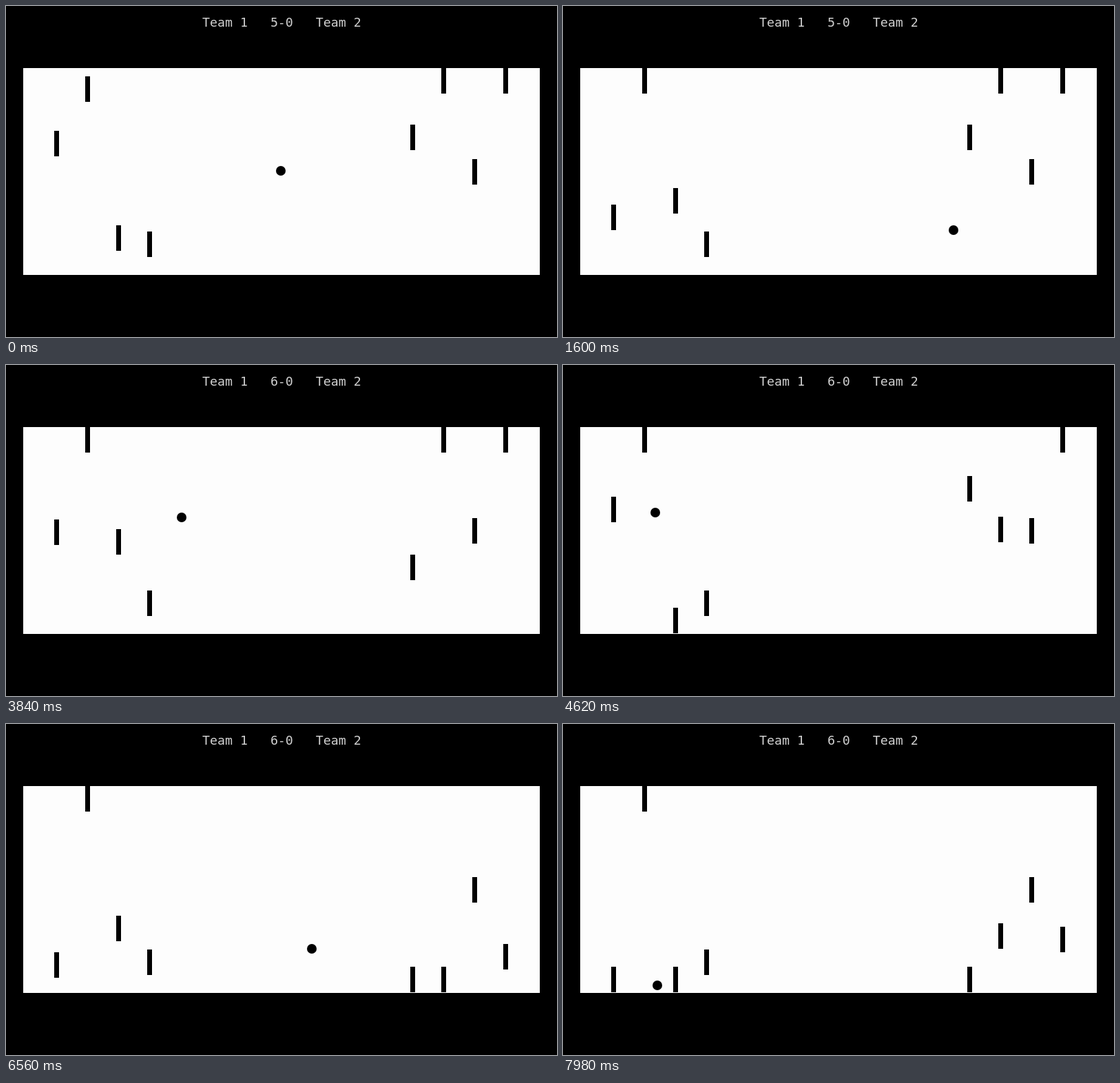
An HTML page with a canvas that plays this animation: 800x480 px, repeating every 8000 ms.

```html
<!DOCTYPE html>
<html lang="en">
<head>
<meta charset="utf-8">
<title>Team pong</title>
<style>
  html, body { margin: 0; width: 100%; height: 100%; overflow: hidden; background: #000; }
  canvas { display: block; }
</style>
</head>
<body>
<canvas id="stage" width="800" height="480"></canvas>
<script>
const ctx = document.getElementById('stage').getContext('2d');
const LOOP = 8000, STEP = 20, GOAL_TIME = 2280;
const CENTRE = { x: 399, y: 239 };
const LEFT_HIT = 77.5, RIGHT_HIT = 580, FLOOR = 382.5;
const BALL_SPEED = 0.3, PADDLE_SPEED = 0.31; // px per ms

// A paddle rests at `top` until an order [ms, new top] sends it off at PADDLE_SPEED.
const paddles = [
  { x: 70, top: 181, orders: [[80, 288], [2000, 273], [2600, 224], [4000, 185],
                              [4600, 243], [5500, 331], [7000, 300], [7780, 352]] },
  { x: 115, top: 102, orders: [[80, 90], [5000, 127], [5500, 90]] },
  { x: 160, top: 318, orders: [[80, 264], [2000, 284], [2600, 238], [4200, 352], [5900, 278], [6700, 352]] },
  { x: 205, top: 327, orders: [] },
  { x: 587, top: 172, orders: [[2600, 275], [4200, 161], [5600, 352]] },
  { x: 632, top: 90, orders: [[4200, 261], [5900, 352], [7000, 289]] },
  { x: 677, top: 222, orders: [] },
  { x: 722, top: 90, orders: [[5820, 319], [7000, 294]] }
];

function paddleTop({ top, orders }, t) {
  for (const [start, goal] of orders) {
    const reach = Math.max(0, t - start) * PADDLE_SPEED;
    top += Math.max(-reach, Math.min(reach, goal - top));
  }
  return top;
}

// The ball keeps its horizontal speed; each paddle hit turns it and sets the next vertical speed.
function serve(time, direction, verticalSpeeds) {
  let { x, y } = CENTRE, left = Math.max(0, time), vx = direction * BALL_SPEED;
  verticalSpeeds.forEach((vy, i) => {
    const wall = vx < 0 ? LEFT_HIT : RIGHT_HIT;
    const last = i === verticalSpeeds.length - 1;
    const dt = last ? left : Math.min(left, (wall - x) / vx);
    x += vx * dt;
    y += vy * dt;
    left -= dt;
    vx = -vx;
  });
  return { x, y: y > FLOOR ? 2 * FLOOR - y : y };
}

const ballAt = t => t < GOAL_TIME
  ? serve(t - 1040, 1, [0.1535])
  : serve(t - 3360, -1, [-0.0375, 0.079, -0.011, 0.335]);

function draw(t) {
  ctx.fillStyle = '#000';
  ctx.fillRect(0, 0, 800, 480);

  ctx.fillStyle = '#d0d0d0';
  ctx.font = '18.25px "DejaVu Sans Mono", monospace';
  ctx.fillText(`Team 1   ${t < GOAL_TIME ? 5 : 6}-0   Team 2`, 285, 30);

  ctx.fillStyle = '#fdfdfd';
  ctx.fillRect(25, 90, 750, 300);

  ctx.fillStyle = '#000';
  for (const paddle of paddles) ctx.fillRect(paddle.x, Math.round(paddleTop(paddle, t)), 7, 37);

  const ball = ballAt(t);
  ctx.beginPath();
  ctx.arc(Math.round(ball.x), Math.round(ball.y), 7, 0, 2 * Math.PI);
  ctx.fill();
}

function tick() {
  draw(Math.floor(performance.now() % LOOP / STEP) * STEP);
  requestAnimationFrame(tick);
}
tick();
</script>
</body>
</html>
```
